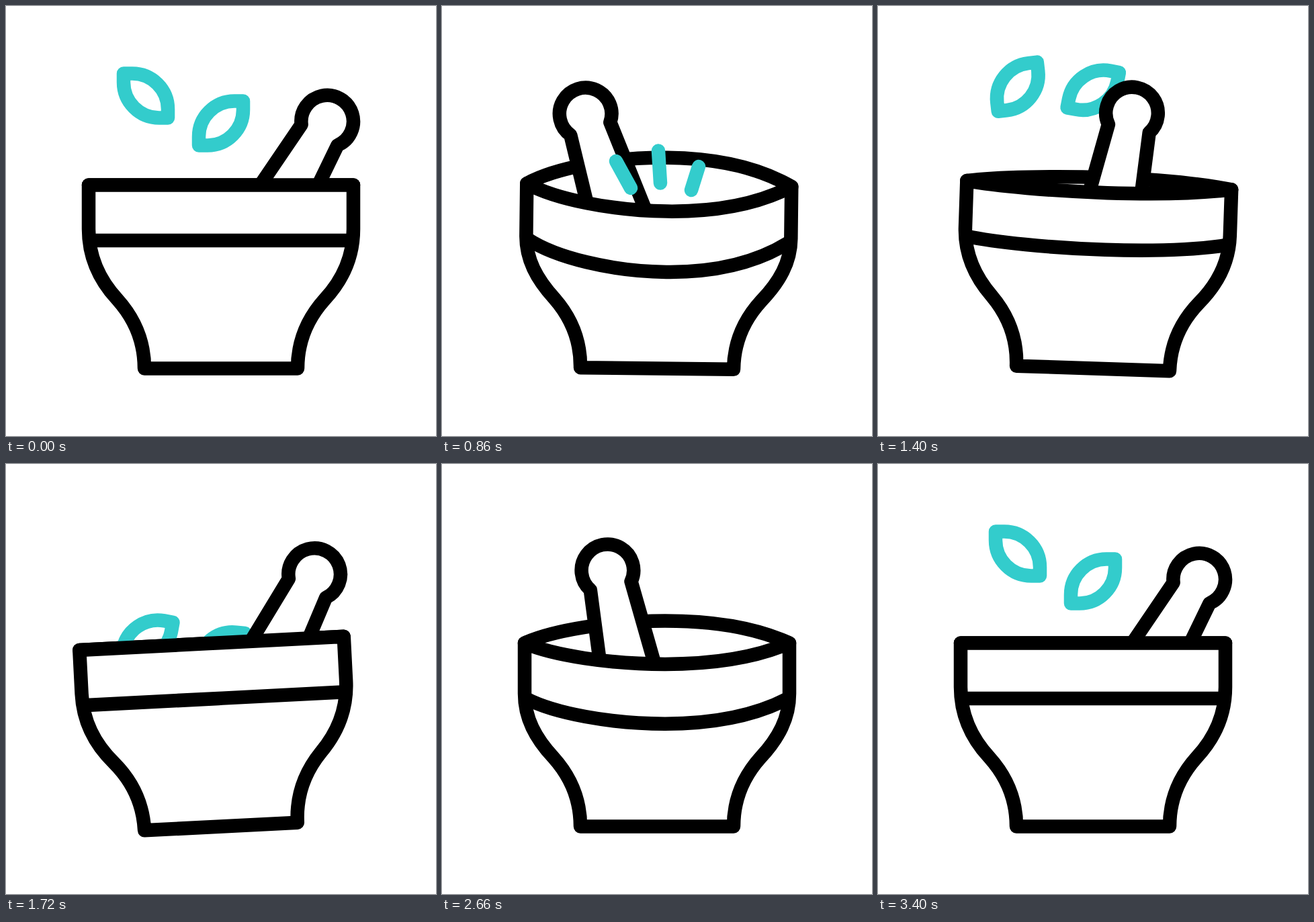
Write an HTML page that moves like this. It is 640x640 px and loops after 3520 ms.

```html
<!DOCTYPE html>
<html lang="en">
<head>
<meta charset="utf-8">
<title>Mortar and pestle</title>
<style>
  html, body { margin: 0; width: 100%; height: 100%; overflow: hidden; background: #fff; }
  svg { display: block; width: 100vw; height: 100vh; }
  path { fill: none; stroke: #000; stroke-width: 20.5; stroke-linecap: round; stroke-linejoin: round; }
  .solid { fill: #fff; }
  .teal path { stroke: #33cccc; }
</style>
</head>
<body>
<svg viewBox="0 0 640 640">
  <g class="tilt"><path id="back"/></g>
  <g class="teal">
    <path id="left" d="M-33-33h13A53 53 0 0 1 33 20v13h-13A53 53 0 0 1-33-20z"/>
    <path id="right" d="M-33 33v-13A53 53 0 0 1 20-33h13v13A53 53 0 0 1-20 33z"/>
  </g>
  <g class="tilt">
    <path id="pestle" class="solid" d="M-43.4 193L-31 23A38.8 38.8 0 1 1 31 23L43.4 193"/>
    <path id="body" class="solid"/>
    <path id="band"/>
  </g>
  <g class="teal" id="sparks">
    <path pathLength="1" d="M281 271L259 231"/>
    <path pathLength="1" d="M325 263.5L322 215.5"/>
    <path pathLength="1" d="M371 274L382 239"/>
  </g>
</svg>
<script>
const LOOP = 3520, STEP = 20;
const START = 180, REFILL = 1720, END = 3390;
const $ = id => document.getElementById(id);
const place = (el, value) => el.setAttribute('transform', value);
const tilts = document.querySelectorAll('.tilt');

const span = (t, a, b) => Math.min(1, Math.max(0, (t - a) / (b - a)));
const sine = k => (1 - Math.cos(Math.PI * k)) / 2;

// The bowl rocks between -3.1 and 6.2 degrees, easing in from rest and back to it
function tiltAt(t) {
  const low = 630, period = 1045, lastHigh = low + 1.5 * period;
  if (t < low) return -3.1 * sine(span(t, START, low));
  if (t > lastHigh) return 6.2 * sine(1 - span(t, lastHigh, 2650));
  return -3.1 + 9.3 * sine(2 * (t - low) / period);
}

// The pestle swings over and back twice: 0 is at rest, 1 is far left
const hump = k => Math.pow(Math.abs(Math.sin(Math.PI * k)), 1.8);
const swingAt = t => t < REFILL
  ? 1.03 * hump(span(t, START, REFILL))
  : 0.975 * hump(Math.pow(span(t, REFILL, END), 0.84));

// Shallow arc from the left wall to the right, dipping by d
const arc = (l, r, y, d) =>
  `M${l} ${y}C${l + 42} ${y + d * .58} 250 ${y + d} 332 ${y + d}S${r - 42} ${y + d * .58} ${r} ${y}`;

function drawBowl(t) {
  const p = swingAt(t), open = Math.pow(p, 1.45), dip = 39 * open;
  const wall = 332 + 12 * open, bulge = 374 + 5 * open;
  tilts.forEach(g => place(g, `rotate(${tiltAt(t)} 320 540)`));
  $('back').setAttribute('d', arc(123, 517, 266.5, -dip * 1.05));
  $('band').setAttribute('d', arc(125, 515, 349, dip * 1.2));
  $('body').setAttribute('d', arc(123, 517, 266.5, dip) +
    `V${wall}C517 ${bulge} 501 408 474 437C448 466 434 500 434 539.5H206` +
    `C206 500 192 466 166 437C139 408 123 ${bulge} 123 ${wall}Z`);
  place($('pestle'),
    `translate(${478 - 269 * p} ${172 - 50 * p + 40 * p * p}) rotate(${30 - 48.5 * p})`);
}

// Leaves drop in from rest, a second pair falls straight through, a third settles at rest.
// `turn` is the second pair's angle, `spin` the degrees gained per pixel fallen.
function drawLeaf(t, { id, x, y, pace, passes, turn, spin }) {
  let drop;
  const first = t < 720, last = t > 2400;
  if (first) drop = 280 * span(t, START, 700) ** 2;
  else if (last) drop = -235 * (1 - span(t, 2760, END)) ** 2;
  else drop = pace * (t - passes);
  const angle = (first || last ? 0 : turn) + spin * drop;
  $(id).style.display = drop < 270 ? '' : 'none';
  place($(id), `translate(${x + drop * spin * .13} ${y + drop}) rotate(${angle})`);
}

// Each burst grows outward from the bowl, then vanishes outward
function drawSparks(t) {
  const burst = t < REFILL ? 0 : 1, age = t - [740, 2080][burst];
  const head = span(age, 0, 110), tail = span(age, 130, 260);
  const g = $('sparks');
  g.style.display = head > 0 && tail < 1 ? '' : 'none';
  g.style.strokeDasharray = `${head - tail} 2`;
  g.style.strokeDashoffset = -tail;
  place(g, `translate(${12 * burst} ${-2 * burst})`);
}

const start = performance.now();
function frame() {
  const t = Math.floor(((performance.now() - start) % LOOP) / STEP) * STEP;
  drawBowl(t);
  drawLeaf(t, { id: 'left', x: 208, y: 133.5, pace: .444, passes: 1430, turn: 85, spin: .12 });
  drawLeaf(t, { id: 'right', x: 320, y: 174.5, pace: .488, passes: 1501, turn: 9.4, spin: -.032 });
  drawSparks(t);
  requestAnimationFrame(frame);
}
frame();
</script>
</body>
</html>
```
